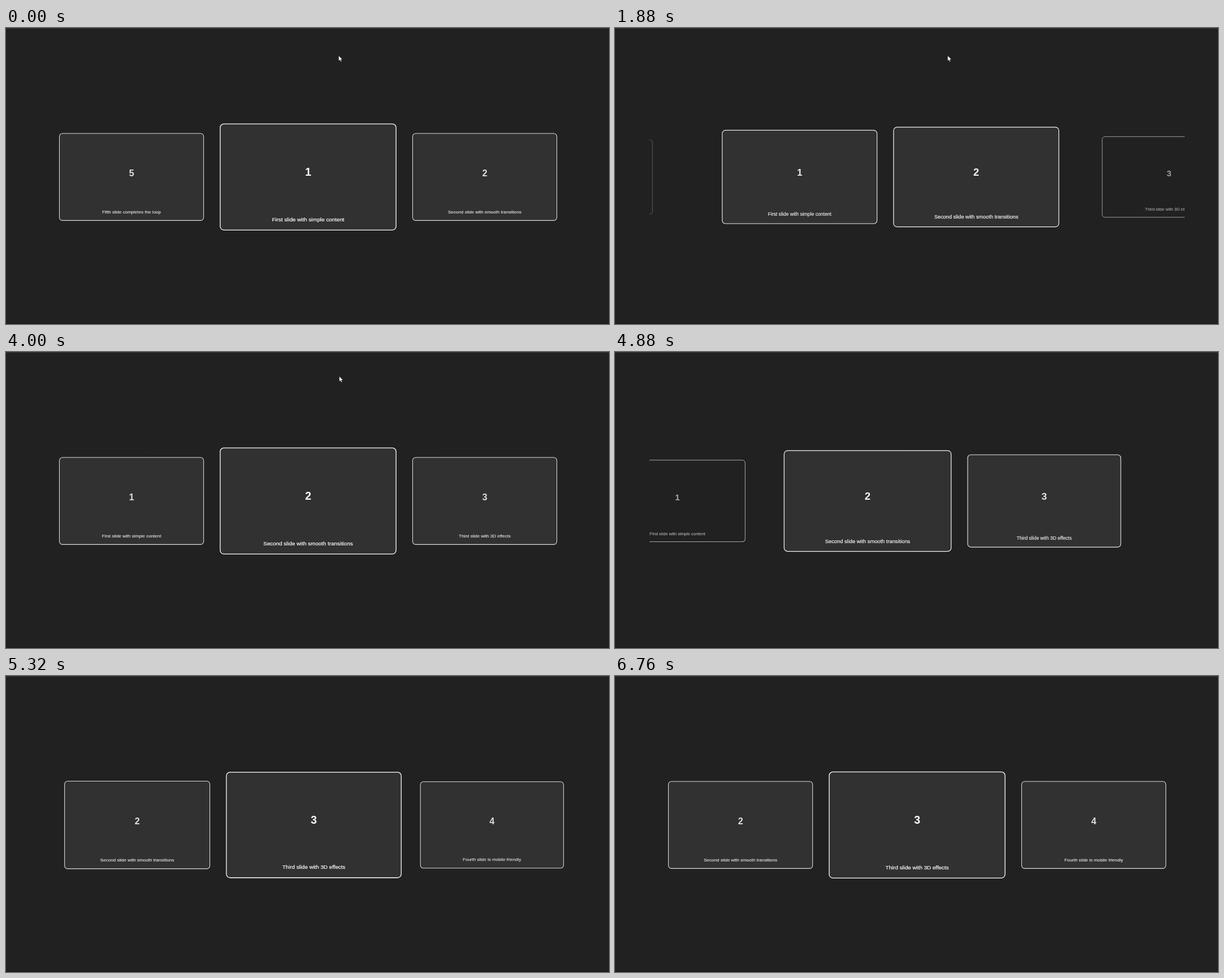
An HTML page for the animation above (6.8 s loop, 1067 by 525 pixels).

```html
<!DOCTYPE html>
<html lang="en">
<head>
<meta charset="utf-8">
<title>Slide carousel</title>
<style>
  html, body { margin: 0; width: 100%; height: 100%; overflow: hidden; background: #212121; }
  svg { display: block; width: 1067px; height: 525px; }
  text { font-family: "Liberation Sans", Arial, sans-serif; fill: #fff; text-anchor: middle; }
  .num { font-size: 19.6px; font-weight: bold; }
  .cap { font-size: 9.8px; stroke: #fff; stroke-width: .2px; }
</style>
</head>
<body>
<svg id="stage" viewBox="0 0 1067 525">
  <defs><clipPath id="view"><rect x="61" y="0" width="947" height="525"/></clipPath></defs>
  <rect width="1067" height="525" fill="#212121"/>
  <rect width="1067" height="1" fill="#393939"/>
  <rect y="524" width="1067" height="1" fill="#1a1819"/>
  <g id="track" clip-path="url(#view)"></g>
  <path id="cursor" d="M0 0V9.6L2.2 7.6L3.7 11L5.4 10.3L3.9 7H6.9Z" fill="#fff" stroke="#111" stroke-width=".6"/>
</svg>
<script>
  const LOOP = 6800;
  const CENTER = { x: 534.6, y: 264.2 };
  const CARD = { w: 312.5, h: 189.5, line: 1.3, r: 6.5 };
  const SIDE_OPACITY = 0.85;
  const MOVES = [1586, 4734];   // start of each slide change
  const DURATION = 760, SETTLE = 640;
  const CAPTIONS = [
    "First slide with simple content",
    "Second slide with smooth transitions",
    "Third slide with 3D effects",
    "Fourth slide is mobile friendly",
    "Fifth slide completes the loop"
  ];

  const track = document.getElementById("track");
  const cursor = document.getElementById("cursor");

  function add(parent, tag, attrs, text) {
    const node = document.createElementNS("http://www.w3.org/2000/svg", tag);
    for (const key in attrs) node.setAttribute(key, attrs[key]);
    if (text) node.textContent = text;
    return parent.appendChild(node);
  }

  function makeCard(slot) {
    const n = (slot + 5) % 5;
    const w = CARD.w - CARD.line, h = CARD.h - CARD.line;
    const box = { x: -w / 2, y: -h / 2, width: w, height: h, rx: CARD.r };
    const group = add(track, "g", {});
    const fill = add(group, "rect", { ...box, fill: "#313131" });
    const ink = add(group, "g", {});
    add(ink, "rect", { ...box, fill: "none", stroke: "#fff", "stroke-width": CARD.line });
    add(ink, "text", { class: "num", y: -2 }, String(n + 1));
    add(ink, "text", { class: "cap", y: 78.5 }, CAPTIONS[n]);
    return { slot, group, fill, ink };
  }

  const cards = [-1, 0, 1, 2, 3, 4].map(makeCard);

  const clamp = v => Math.min(1, Math.max(0, v));
  const bezier = (s, a, b) => 3 * s * (1 - s) ** 2 * a + 3 * s * s * (1 - s) * b + s ** 3;

  // cubic-bezier(.25, .1, .25, 1)
  function ease(x) {
    let lo = 0, hi = 1;
    for (let i = 0; i < 24; i++) {
      const mid = (lo + hi) / 2;
      if (bezier(mid, 0.25, 0.25) < x) lo = mid; else hi = mid;
    }
    return bezier(lo, 0.1, 1);
  }

  function slideProgress(elapsed) {
    if (elapsed <= 0) return 0;
    return elapsed >= SETTLE ? 1 : ease(elapsed / DURATION);
  }

  function placeCard(card, position) {
    const d = card.slot - position, dist = Math.abs(d);
    card.group.style.display = dist < 2 ? "" : "none";
    if (dist >= 2) return;
    const outer = Math.max(0, dist - 1);
    const x = CENTER.x + Math.sign(d) * (312.5 * dist + 85.6 * outer);
    const opacity = outer ? SIDE_OPACITY * (1 - outer) : 1 - (1 - SIDE_OPACITY) * dist;
    card.group.setAttribute("transform", `translate(${x} ${CENTER.y}) scale(${1 - 0.18 * dist})`);
    card.ink.setAttribute("opacity", opacity);
    card.fill.setAttribute("opacity", opacity > 0.68 ? 1 : 0);
  }

  function placeCursor(t) {
    const nudge = clamp((t - 3480) / 80);
    const leave = clamp((t - 4640) / 120);
    const x = 588.6 + nudge + 8 * leave;
    const y = 49 - 6 * nudge - 60 * leave;
    cursor.setAttribute("transform", `translate(${x} ${y})`);
  }

  function draw(t) {
    const position = MOVES.reduce((sum, start) => sum + slideProgress(t - start), 0);
    cards.forEach(card => placeCard(card, position));
    placeCursor(t);
  }

  const begin = performance.now();
  function tick() {
    draw((performance.now() - begin) % LOOP);
    requestAnimationFrame(tick);
  }
  tick();
</script>
</body>
</html>
```
